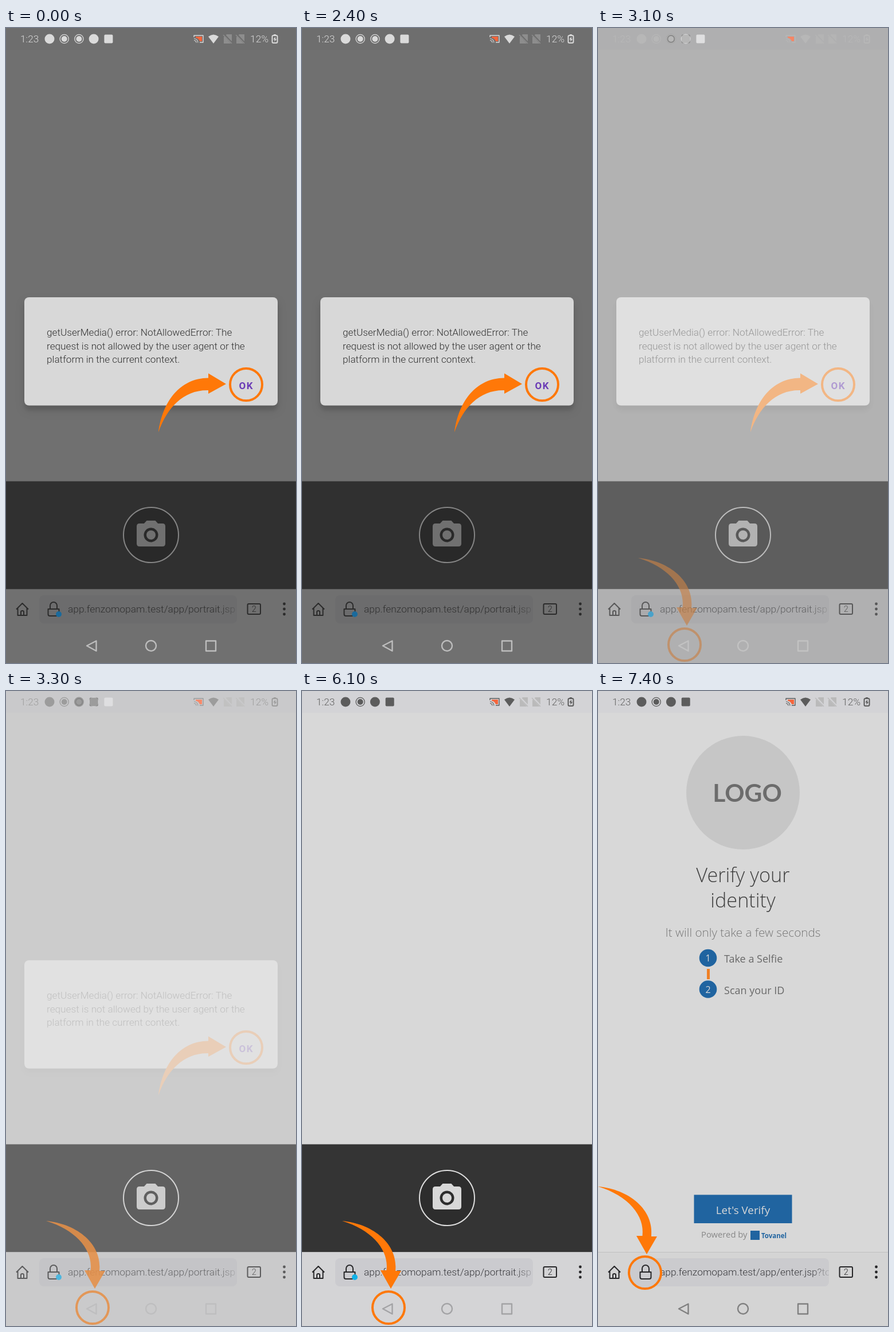
Recreate the animation shown at these times as an HTML page. Size 506 by 1106 pixels, loop 8 s.

```html
<!DOCTYPE html>
<html lang="en">
<head>
<meta charset="utf-8">
<title>Permission steps</title>
<style>
  html, body { margin: 0; width: 100%; height: 100%; overflow: hidden; background: #fff; }
  svg { display: block; width: 100%; height: 100%; }
  text { font-family: Roboto, sans-serif; font-weight: 300; }
  .page text { font-family: "Open Sans", sans-serif; font-weight: 400; }
  .page .thin { font-weight: 300; }
  .page .firm { font-weight: 500; }
  .page .name { font-weight: 700; }
  .page .logo { font-family: Lato, sans-serif; font-weight: 700; }
  .action { font-weight: 700; letter-spacing: 1.5px; }
  .mid { text-anchor: middle; }
  .shadow { filter: drop-shadow(0 8px 3px rgba(0, 0, 0, .1)) drop-shadow(0 7px 8px rgba(0, 0, 0, .1)); }
</style>
</head>
<body>
<svg id="stage" viewBox="0 0 506 1106"></svg>
<script>
const ORANGE = '#ff7808', BLUE = '#2064a0';

const dim = {
  bg: '#707070', top: '#6e6e6e', bar: '#707070', pill: '#6c6c6d', edge: '#5c5c5c',
  status: '#dadada', icon: '#dadada', faint: '#8d8d8d', ink: '#2b2b2b', url: '#303030',
  nav: '#bdbdbd', panel: '#303030', disc: '#292929', ring: '#858585', camera: '#707070', dot: '#1a6a9c'
};
const lit = {
  bg: '#d8d8d8', top: '#d3d3d6', bar: '#d4d4d6', pill: '#cbcbcf', edge: '#bfbfbf',
  status: '#606060', icon: '#5c5c5c', faint: '#bababa', ink: '#262628', url: '#38383c',
  nav: '#a3a3a5', panel: '#343434', disc: '#2d2d2d', ring: '#dedede', camera: '#d8d8d8', dot: '#12b2e8'
};
const plain = { ...lit, bar: '#d4d4d4', pill: '#cbcbce', nav: '#808080' };

const rect = (x, y, w, h, fill, r = 0) =>
  `<rect x="${x}" y="${y}" width="${w}" height="${h}" rx="${r}" fill="${fill}"/>`;
const frame = (x, y, w, h, color) =>
  `<rect x="${x}" y="${y}" width="${w}" height="${h}" rx="2" fill="none" stroke="${color}" stroke-width="2"/>`;
const disc = (x, y, r, fill) => `<circle cx="${x}" cy="${y}" r="${r}" fill="${fill}"/>`;
const ring = (x, y, r, color, width) =>
  `<circle cx="${x}" cy="${y}" r="${r}" fill="none" stroke="${color}" stroke-width="${width}"/>`;
const line = (d, color, width = 2) =>
  `<path d="${d}" fill="none" stroke="${color}" stroke-width="${width}" stroke-linejoin="round"/>`;
const shape = (d, fill) => `<path d="${d}" fill="${fill}"/>`;
const text = (x, y, size, fill, str, style = '', attrs = '') =>
  `<text x="${x}" y="${y}" font-size="${size}" fill="${fill}" class="${style}" ${attrs}>${str}</text>`;

const noSim = (x, c) => shape(`M${x - 2} 11H${x + 7}V27H${x - 7}V16Z`, c.faint) +
  line(`M${x - 7} 11L${x + 8} 27`, c.top, 3.5) + line(`M${x - 8} 12L${x + 7} 27`, c.faint, 1.4);

// Row of notification icons, then signal and battery
function statusBar(c, records) {
  let x = 76, out = rect(0, 0, 506, 38, c.top) + text(25, 25, 17.2, c.status, '1:23');
  out += disc(x, 19, 8.5, c.icon);
  for (let i = 0; i < records; i++) {
    x += 25.7;
    out += ring(x, 19, 7.6, c.icon, 1.3) + disc(x, 19, 5, c.icon);
  }
  out += disc(x + 25.7, 19, 8.5, c.icon) + rect(x + 44, 11.5, 15, 15, c.icon, 2);
  return out + line('M328 16V13H344V25H338', c.icon, 1.4) +
    shape('M331 15H342V23H338Q336 18 331 17Z', '#f4653c') +
    line('M328 18.5Q334.5 19 335 25.5M328 21.5Q332 22 332 25.5', c.icon, 1.2) +
    shape('M353 15Q362 8 371 15L362 27Z', c.icon) + noSim(387, c) + noSim(409, c) +
    text(426, 25, 17.4, c.status, '12%') +
    rect(467, 11, 4, 3, c.icon) + frame(464.5, 13, 9, 13, c.icon) +
    shape('M470 15L466.5 20H468.5V24L472 19H470Z', c.icon);
}

const lock = c => line('M73.5 1012H92.5V1021Q92.5 1024 89.5 1024H76.5Q73.5 1024 73.5 1021Z' +
  'M77 1012V1006A6 6 0 0 1 89 1006V1012', c.ink);

function browserBar(c, url) {
  return rect(0, 977, 506, 129, c.bar) + rect(0, 977, 506, 1, c.edge) + rect(58, 988, 345, 49, c.pill, 8) +
    line('M18 1012.5L28.5 1002 39 1012.5M20.5 1010V1023H36.500V1010M26 1023V1017Q26 1015 28.5 1015T31 1017V1023', c.ink) +
    text(108, 1018, 17.4, c.url, url, '', 'mask="url(#fade)"') +
    frame(421.5, 1003, 22.5, 18, c.ink) + text(432.7, 1017, 14.5, c.ink, '2', 'mid') +
    [1003, 1012, 1021].map(y => disc(485.5, y, 2.4, c.ink)).join('') +
    line('M141 1076L157.5 1067.5V1085Z', c.nav, 2.4) + ring(253, 1076, 9, c.nav, 2.4) +
    line('M349 1067.5H366V1085H349Z', c.nav, 2.4);
}

function cameraPanel(c) {
  return rect(0, 789.5, 506, 187.5, c.panel) + disc(253, 883, 48, c.disc) + ring(253, 883, 48, c.ring, 2) +
    '<g transform="translate(223 853) scale(2.5)">' +
    shape('M9 2 7.17 4H4Q2 4 2 6V18Q2 20 4 20H20Q22 20 22 18V6Q22 4 20 4H16.83L15 2Z', c.camera) +
    disc(12, 12, 5, c.disc) + disc(12, 12, 3.2, c.camera) + '</g>';
}

const downArrow = shape('M70 923C124 928 168 963 163 1010H173L155 1041 137 1009H147.5C152 974 123 939 70 923Z', ORANGE);
const sideArrow = shape('M266 704C273 651 303 610 353 609.5V601.5L384 620 353 637V631C310 630 281 661 266 704Z', ORANGE);
const CAPTURE = 'app.fenzomopam.test/app/portrait.jsp', START = 'app.fenzomopam.test/app/enter.jsp?to';

const base = (c, records) => rect(0, 0, 506, 1106, c.bg) + statusBar(c, records);
const capture = (c, records) => base(c, records) + cameraPanel(c) + browserBar(c, CAPTURE) +
  lock(c) + disc(92, 1021, 5, c.dot);

function dialogScene() {
  const message = ['getUserMedia() error: NotAllowedError: The',
    'request is not allowed by the user agent or the', 'platform in the current context.'];
  return capture(dim, 2) + `<g class="shadow">${rect(32, 469, 442, 188.5, '#d8d8d8', 8)}</g>` +
    message.map((s, i) => text(71, 536 + i * 23.5, 17.2, '#303030', s)).join('') +
    text(406.5, 629, 17, '#6b3cb6', 'OK', 'action') +
    ring(419, 621, 28, ORANGE, 4) + `<g id="side">${sideArrow}</g>`;
}

function cameraScene() {
  return capture(lit, 1) + ring(151, 1074, 28, ORANGE, 4) + `<g id="down">${downArrow}</g>`;
}

function startScene() {
  const c = plain;
  const item = (n, y, s) => disc(192, y, 15.3, BLUE) + text(192, y + 6, 16, '#d8d8d8', n, 'mid') +
    text(220, y + 8, 18, '#696969', s);
  const page = disc(253, 177, 99, '#c6c6c6') + text(260.5, 193, 42.5, '#6c6c6c', 'LOGO', 'mid logo') +
    text(253, 333, 34.3, '#404040', 'Verify your', 'mid thin') +
    text(253, 377, 34.3, '#404040', 'identity', 'mid thin') +
    text(253, 428, 20.7, '#777', 'It will only take a few seconds', 'mid thin') +
    rect(190, 484, 5, 18, '#f08024') + item(1, 465, 'Take a Selfie') + item(2, 519.5, 'Scan your ID') +
    rect(167.5, 877.5, 171, 49.5, BLUE) + text(253, 911, 18.8, '#d8d8d8', "Let's Verify", 'mid firm') +
    text(180, 952, 14.8, '#888', 'Powered by') +
    rect(266, 940, 16, 16, BLUE) + text(285, 953, 11.5, BLUE, 'Tovanel', 'name');
  return base(c, 1) + `<g class="page">${page}</g>` + browserBar(c, START) +
    disc(82, 1013, 28, c.pill) + lock(c) + ring(82, 1013, 28, ORANGE, 4) +
    `<g transform="translate(-70 -60)">${downArrow}</g>`;
}

const $ = id => document.getElementById(id);
$('stage').innerHTML = `<defs>
  <linearGradient id="ramp" gradientUnits="userSpaceOnUse" x1="372" y1="0" x2="404" y2="0">
    <stop offset="0" stop-color="#fff"/><stop offset="1" stop-color="#222"/></linearGradient>
  <mask id="fade" maskUnits="userSpaceOnUse" x="100" y="985" width="303" height="55">
    ${rect(100, 985, 303, 55, 'url(#ramp)')}</mask></defs>
  <g id="dialog">${dialogScene()}</g><g id="camera">${cameraScene()}</g><g id="start">${startScene()}</g>`;

// Fades advance in nine 100 ms steps; arrows jump back and forth four times
const fade = (t, start) => Math.min(9, Math.max(0, Math.floor((t - start) / 100) + 1)) / 9;
const away = (t, start) => t >= start && t < start + 1400 && Math.floor((t - start) / 200) % 2 === 0;

function show(id, alpha) {
  $(id).setAttribute('opacity', alpha);
  $(id).setAttribute('display', alpha > 0 ? 'inline' : 'none');
}

function draw(now) {
  const t = now % 8000, first = fade(t, 2900), second = fade(t, 6600);
  show('dialog', 1 - first);
  show('camera', first * (1 - second));
  show('start', second);
  $('side').setAttribute('transform', `translate(${away(t, 1000) ? -17 : 0} 0)`);
  $('down').setAttribute('transform', `translate(0 ${away(t, 4700) ? -17.5 : 0})`);
}

const began = performance.now();
function tick() {
  draw(performance.now() - began);
  requestAnimationFrame(tick);
}
tick();
</script>
</body>
</html>
```
